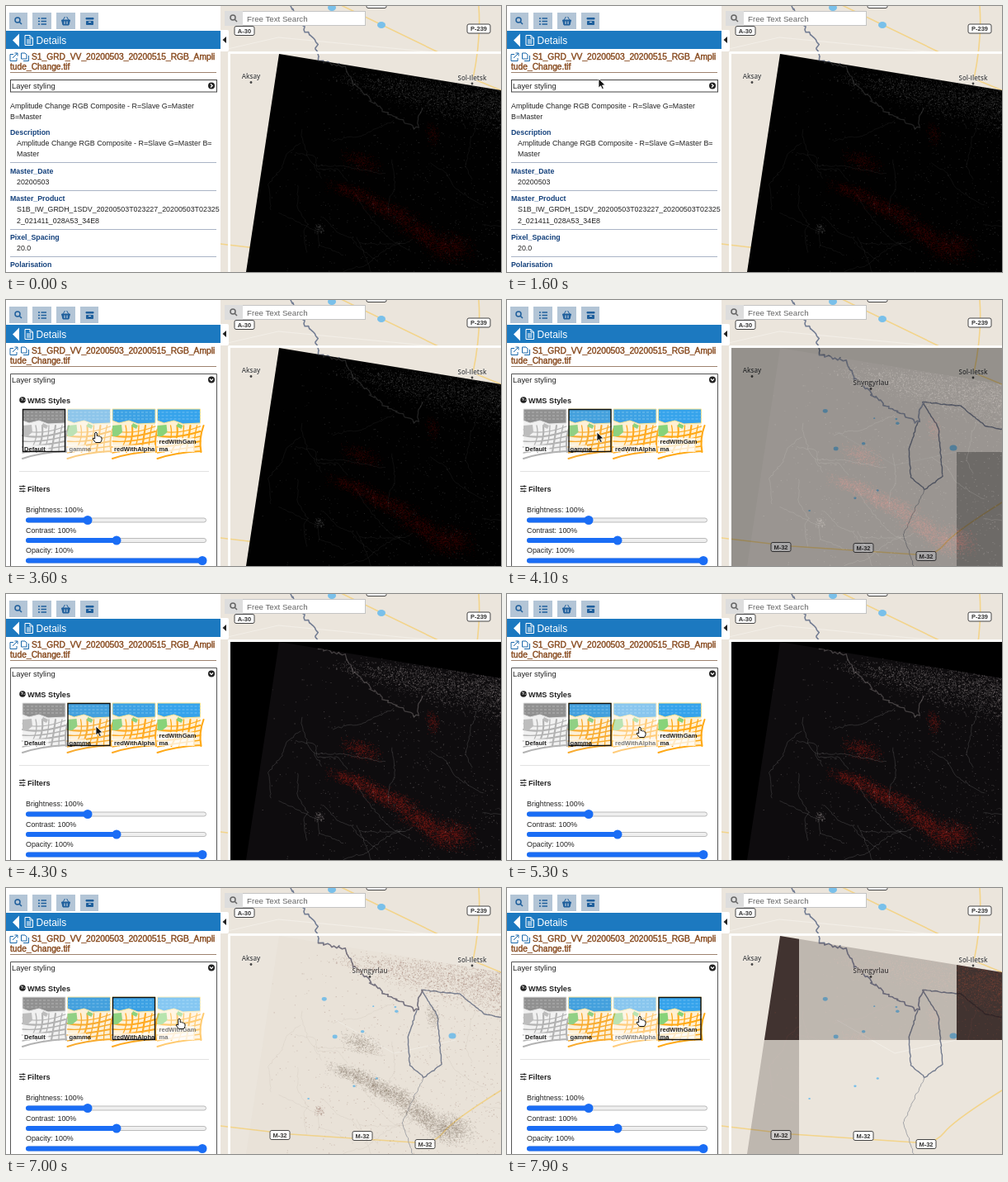
An HTML page with a canvas that plays this animation: 600 by 322 pixels, repeating every 8 s.

```html
<!DOCTYPE html>
<html lang="en">
<head>
<meta charset="utf-8">
<title>Layer styling</title>
<style>
html, body { margin: 0; width: 600px; height: 322px; overflow: hidden; background: #ebe5dc; }
svg, canvas { position: absolute; left: 0; top: 0; }
text { font-family: "Liberation Sans", Arial, sans-serif; font-size: 8.9px; fill: #222; white-space: pre; }
.place { font-family: "Open Sans", sans-serif; font-size: 8px; font-weight: 600; text-anchor: middle; fill: #444; stroke: #f4f0ea; stroke-width: 1.2px; paint-order: stroke; }
.shield { font-size: 7.5px; font-weight: bold; text-anchor: middle; fill: #333; }
.key { font-weight: bold; fill: #14417c; font-size: 8.8px; }
.head { font-weight: bold; font-size: 9.2px; }
.title { font-size: 10.25px; fill: #86481c; stroke: #86481c; stroke-width: .4px; }
.tag { font-size: 7.6px; font-weight: bold; }
.line { fill: none; stroke-linejoin: round; stroke-linecap: round; }
</style>
</head>
<body>
<svg width="600" height="322">
  <rect width="600" height="322" fill="#ebe5dc"/>
  <g class="line">
    <path d="M260 54L330 38L520 56M545 184L470 200L400 160" stroke="#f3efe8"/>
    <path d="M260 288L345 298L495 308Q518 311 530 296T600 245M573 0Q576 40 566 88L600 102M404 -2L524 56" stroke="#f3d48a" stroke-width="1.6"/>
    <path id="river" stroke="#737d93" stroke-width="1.6"/>
    <path id="border" stroke="#747c8f" stroke-width="1.4"/>
    <path id="stream" stroke="#9b9da3" stroke-width=".9"/>
    <path d="M270.500 324V56.500H602" stroke="#fdfdfb" stroke-width="3"/>
  </g>
  <g id="places"></g>
</svg>
<canvas id="layer" width="600" height="322"></canvas>
<svg width="600" height="322">
  <defs>
    <g id="art">
      <rect width="52" height="52" fill="#fcf0d8"/>
      <g id="streets" class="line" stroke="#f5ab35"/>
      <path d="M0 0H52V17L31 18L20 14L8 17L0 14Z" fill="#479fd9" stroke="#f3e3a0"/>
      <path d="M0 4H52M0 8H52M0 12H52" stroke="#7dbde6" stroke-dasharray="3 2"/>
      <path d="M0 20L11 19L12 28L6 33H0ZM25 17L31 20L29 24L23 21Z" fill="#93cf87"/>
    </g>
    <g id="lens" fill="none" stroke-width="1.5"><circle r="3"/><path d="M2.200 2.200L5 5"/></g>
  </defs>

  <rect x="265.500" y="6.500" width="170" height="17" fill="#fff" stroke="#c4c4c4"/>
  <rect x="265" y="6" width="22" height="18" fill="#ddd"/>
  <use href="#lens" x="275" y="14" stroke="#666"/>
  <text x="292" y="18.500" style="font-size:9.7px;fill:#666">Free Text Search</text>
  <rect x="255" y="29" width="15" height="26" rx="2" fill="#fff"/>
  <path d="M267 37V45L262.500 41Z" fill="#222"/>

  <rect width="260" height="322" fill="#fff"/>
  <path d="M4 18H26M32 18H55M61 18H84M90 18H112" stroke="#b3c5d6" stroke-width="20"/>
  <g stroke="#1f5f9c" fill="#1f5f9c">
    <use href="#lens" x="14" y="17"/>
    <path d="M39 15H49M39 18.500H49M39 22H49" stroke-width="1.600" stroke-dasharray="2 1.500 8"/>
    <path d="M67.500 17H77.500L76 23H69ZM69 17L71.500 13M76 17L73.500 13"/>
    <path d="M97 14.500H106V16H97ZM97.500 18.500H105.500V22.500H97.500Z"/>
  </g>
  <path d="M71 18.500V22M74 18.500V22M100 19.500H103" stroke="#d5e0ea"/>
  <rect y="30" width="260" height="22" fill="#1c79c0"/>
  <path d="M16 33.500V49.500L8 41.500Z" fill="#fff"/>
  <path d="M23 35.500H29L32.500 39V47.500H23ZM29 35.500V39H32.500M25 41H30.500M25 43H30.500M25 45H30.500" fill="none" stroke="#fff"/>
  <text x="36.500" y="46" style="font-size:12px;fill:#fff">Details</text>
  <path d="M9 58.500H5V66.500H13V63M8 63L14 57M10.500 57H14V60.500M18.500 57H23L25 59V64H18.500ZM21 66.500H27.500V60" fill="none" stroke="#1c69aa"/>
  <text class="title" x="31" y="65">S1_GRD_VV_20200503_20200515_RGB_Ampli</text>
  <text class="title" x="5" y="76.500">tude_Change.tif</text>
  <path d="M5 80.500H255" stroke="#86644b" stroke-width=".8"/>

  <g id="info"></g>
  <g id="styling">
    <path d="M5.500 323V89.500H255.500V323" fill="none" stroke="#555"/>
    <circle cx="20" cy="121" r="3.800" fill="#222"/>
    <path d="M18 119L20.500 119.500L19 122M21.500 122L23 120.500" fill="none" stroke="#fff" stroke-width=".8"/>
    <text class="head" x="26" y="124.500">WMS Styles</text>
    <g id="thumbs"></g>
    <path d="M16 207.500H246" stroke="#e2e2e2"/>
    <path d="M16 225.500H23.500M16 228.500H23.500M16 231.500H23.500M21 224V227M18 227V230M21 230V233" stroke="#222" stroke-width=".9"/>
    <text class="head" x="26" y="231.500">Filters</text>
    <g id="ranges"></g>
  </g>
  <text x="7" y="99.800" style="font-size:9.4px">Layer styling</text>
  <circle cx="249" cy="96.500" r="4" fill="#222"/>
  <path id="chevron" d="M248 94.500L250.200 96.500L248 98.500" fill="none" stroke="#fff" stroke-width="1.200"/>

  <g id="pointer" stroke-linejoin="round">
    <path id="arrow" d="M0 0V11L2.600 8.700L4.400 12.600L6.300 11.700L4.500 8L8 7.700Z" fill="#111" stroke="#fff" stroke-width=".8"/>
    <path id="hand" d="M-1.300 7V1Q0 -.8 1.200 1V4.500Q2.500 3.700 3.400 5Q4.700 4.400 5.400 5.700Q7 5.500 7 7V9.500L5.500 12.500H-.5L-4 8Q-3.600 6.200 -1.300 8Z" fill="#fff" stroke="#111"/>
  </g>
</svg>
<script>
const $ = id => document.getElementById(id);
const LOOP = 8000, FADE = 250;
const repeat = (n, make) => Array.from({ length: n }, (_, i) => make(i));

let seed = 7;
const rnd = () => (seed = (seed * 1664525 + 1013904223) % 4294967296) / 4294967296;
const jitter = a => (rnd() + rnd() - 1) * a;

// Path through the given points with small random bends between them
function wiggle(points, amp) {
  let d = 'M' + points[0];
  points.slice(1).forEach(([x1, y1], i) => {
    const [x0, y0] = points[i], n = Math.ceil(Math.hypot(x1 - x0, y1 - y0) / 3);
    for (let k = 1; k <= n; k++)
      d += `L${x0 + (x1 - x0) * k / n + jitter(amp)} ${y0 + (y1 - y0) * k / n + jitter(amp)}`;
  });
  return d;
}

const river = wiggle([[345, 0], [362, 28], [376, 46], [380, 66], [412, 73], [420, 92], [456, 127], [498, 148], [504, 124]], 3);
$('river').setAttribute('d', river);
$('border').setAttribute('d', wiggle([[498, 148], [487, 181], [490, 215], [506, 229], [528, 214], [523, 155], [504, 124], [550, 128], [580, 153], [601, 156]], 1));
$('stream').setAttribute('d', wiggle([[506, 229], [480, 285], [494, 322]], 1.5));

const lake = (x, y, r) => `<ellipse cx="${x}" cy="${y}" rx="${r}" ry="${r * .8}" fill="#79c0ea"/>`;
const shield = (x, y, s, w = 24) => `<rect x="${x - w / 2}" y="${y - 5.5}" width="${w}" height="11" rx="2" fill="#fff" stroke="#444"/>
  <text class="shield" x="${x}" y="${y + 2.7}">${s}</text>`;
const place = (x, y, s) => `<circle cx="${x}" cy="${y}" r="1.4" fill="#444"/><text class="place" x="${x}" y="${y - 4.5}">${s}</text>`;
$('places').innerHTML = lake(455, 23, 5) + lake(395, 2, 5) + lake(541, 179, 4.5) +
  repeat(9, () => lake(365 + rnd() * 110, 125 + rnd() * 145, 1 + rnd() * 2)).join('') +
  shield(289, 30, 'A-30') + shield(573, 27.5, 'P-239', 28) + shield(449, -3, '') +
  shield(332, 299, 'M-32') + shield(432, 300, 'M-32') + shield(508, 310, 'M-32') +
  place(297, 92.5, 'Aksay') + place(565, 94, 'Sol-Iletsk') + place(441, 107.5, 'Shyngyrlau');

const txt = (x, y, s, c = '') => `<text x="${x}" y="${y}" class="${c}">${s}</text>`;
let html = '<rect x="5.5" y="89.5" width="250" height="14.5" fill="none" stroke="#444"/>' +
  txt(5, 124, 'Amplitude Change RGB Composite - R=Slave G=Master') + txt(5, 136.5, 'B=Master');
let row = 156;
[['Description', 'Amplitude Change RGB Composite - R=Slave G=Master B=', 'Master'], ['Master_Date', '20200503'],
 ['Master_Product', 'S1B_IW_GRDH_1SDV_20200503T023227_20200503T02325', '2_021411_028A53_34E8'],
 ['Pixel_Spacing', '20.0'], ['Polarisation', '']].forEach(([key, ...values]) => {
  html += txt(5, row, key, 'key');
  values.forEach(v => html += txt(13, row += 13.2, v));
  html += `<path d="M5 ${Math.floor(row + 7.5)}.5H255" stroke="#aab4c6"/>`;
  row += 20.3;
});
$('info').innerHTML = html;

$('streets').innerHTML = repeat(6, i =>
  `<path d="M0 ${25 + i * 7}Q20 ${33 + i * 4} 52 ${21 + i * 6}M${8 + i * 9} 52Q${20 + i * 6} 36 ${16 + i * 8} 20" stroke-width="${1.3 + i % 2 * .8}"/>`).join('');
const thumbX = i => 20 + i * 54.5;
$('thumbs').innerHTML = [['Default'], ['gamma'], ['redWithAlpha'], ['redWithGam', 'ma']].map((lines, i) => {
  const h = 8.5 * lines.length, look = i ? `saturate(${.95 + i * .1})` : 'grayscale(1)';
  return `<g transform="translate(${thumbX(i)} 132)"><use href="#art" style="filter:${look}"/>
    <rect y="${52 - h}" width="${Math.min(52, lines[0].length * 4.5)}" height="${h}" fill="#fff" opacity=".75"/>
    ${lines.map((s, k) => txt(2, 59.5 - h + k * 9 - .5, s, 'tag')).join('')}
    <rect class="frame" x=".5" y=".5" width="51" height="51" fill="none" stroke="#111" stroke-width="1.4"/></g>`;
}).join('');
const thumbs = [...$('thumbs').children];

$('ranges').innerHTML = [['Brightness', 99], ['Contrast', 134], ['Opacity', 238]].map(([s, x], i) => {
  const y = 266.5 + i * 24.5;
  return txt(24, y - 9.5, s + ': 100%') + `<rect x="24.5" y="${y - 2.5}" width="218" height="5" rx="2.5" fill="#efefef" stroke="#bbb"/>
    <rect x="24" y="${y - 3}" width="${x - 24}" height="6" rx="3" fill="#1a6df5"/><circle cx="${x}" cy="${y}" r="5.5" fill="#1a6df5"/>`;
}).join('');

// Radar scene; every style shows the same features in other colours
function scene({ back, fill, red, grey, line }) {
  seed = 42;
  const c = document.createElement('canvas');
  c.width = 600; c.height = 322;
  const g = c.getContext('2d');
  const edge = x => 58 + (x - 331) * .164;
  const dot = (x, y) => g.fillRect(x, y, .5 + rnd() * .9, .5 + rnd() * .7);
  const smudge = (x, y, rx, ry) => repeat(rx * ry * 1.6 | 0, () => {
    const dx = jitter(rx);
    dot(x + dx, y + dx * .25 + jitter(ry));
  });
  if (back) { g.fillStyle = back; g.fillRect(272, 58, 328, 264); }
  g.clip(new Path2D('M331 58L600 102V322H291Z'));
  g.fillStyle = fill;
  g.fillRect(0, 0, 600, 322);

  // Burnt ground: a band running down to the right
  g.fillStyle = red;
  smudge(430, 188, 28, 14);
  smudge(516, 155, 9, 16);
  repeat(9, i => smudge(410 + i * 17, 217 + i * 10 + jitter(12), 26, 10 + i));

  // Settled ground: dense below the upper edge, thin elsewhere
  g.fillStyle = grey;
  repeat(2600, () => {
    const x = 390 + 210 * Math.sqrt(rnd());
    dot(x, edge(x) + 18 + jitter(10 + (x - 390) * .15));
  });
  repeat(900, () => dot(300 + 300 * Math.sqrt(rnd()), 80 + rnd() * 242));
  smudge(380, 270, 7, 7);

  g.strokeStyle = line;
  g.lineWidth = .6;
  repeat(16, () => {
    const x = 310 + rnd() * 280, y = 100 + rnd() * 200, a = rnd() * 6.28;
    g.stroke(new Path2D(wiggle(repeat(5, k => [x + 20 * k * Math.cos(a) + jitter(12), y + 20 * k * Math.sin(a) + jitter(12)]), 1.5)));
  });
  g.strokeStyle = grey;
  g.lineWidth = 1.3;
  g.stroke(new Path2D(river));
  return c;
}

// Tiles are numbered row by row; start gives the time each begins to fade in
const order = [0, 1, 0, 1, 2, 3];
const layers = [
  { at: 0, start: () => -FADE,
    look: { fill: '#010101', red: 'rgba(130,22,18,.16)', grey: 'rgba(130,130,130,.25)', line: 'rgba(120,120,120,.2)' } },
  { at: 3700, start: i => 4010 - 50 * (i > 4),
    look: { back: '#000', fill: '#0e0c0e', red: 'rgba(180,42,32,.26)', grey: 'rgba(165,155,155,.36)', line: 'rgba(150,150,150,.4)' } },
  { at: 5350, start: () => 5600,
    look: { fill: 'rgba(190,175,160,.05)', red: 'rgba(100,85,72,.2)', grey: 'rgba(125,85,70,.28)', line: 'rgba(150,125,110,.16)' } },
  { at: 7200, start: i => 7685 + 160 * order[i],
    look: { fill: '#261716', red: 'rgba(140,40,25,.3)', grey: 'rgba(125,48,34,.4)', line: 'rgba(105,45,38,.35)' } }
];
layers.forEach(l => l.img = scene(l.look));
const colX = [272, 354, 545, 600], rowY = [56, 184, 322];
const ctx = $('layer').getContext('2d');

function drawLayer(t, { start, img }) {
  ctx.clearRect(0, 0, 600, 322);
  order.forEach((_, i) => {
    const c = i % 3, r = i / 3 | 0, x = colX[c], y = rowY[r], w = colX[c + 1] - x, h = rowY[r + 1] - y;
    ctx.globalAlpha = Math.min(1, Math.max(0, (t - start(i)) / FADE));
    ctx.drawImage(img, x, y, w, h, x, y, w, h);
  });
}

// Pointer rests: arrive, leave, x, y
const rests = [[0, 600, 200, -20], [1400, 1800, 111, 88], [2100, 2900, 93, 96], [3500, 4700, 109, 160],
  [5200, 6500, 161, 161], [7000, 7250, 210, 158], [7650, LOOP, 161, 155]];
function pointerAt(t) {
  const i = rests.findLastIndex(r => t >= r[0]), [, leave, x, y] = rests[i];
  if (t <= leave) return [x, y];
  const [arrive, , x1, y1] = rests[i + 1], p = (t - leave) / (arrive - leave), e = p * p * (3 - 2 * p);
  return [x + (x1 - x) * e, y + (y1 - y) * e];
}

const show = (el, on) => el.style.display = on ? '' : 'none';
const begin = performance.now();

function draw() {
  const t = (performance.now() - begin) % LOOP, open = t >= 2300, [x, y] = pointerAt(t);
  const chosen = layers.findLastIndex(l => t >= l.at);
  const over = i => open && y > 132 && y < 184 && x >= thumbX(i) && x <= thumbX(i) + 52 && i !== chosen;
  const hand = y > 90 && y < 104 || thumbs.some((_, i) => over(i));
  drawLayer(t, layers[chosen]);
  show($('info'), !open);
  show($('styling'), open);
  $('chevron').setAttribute('transform', open ? 'rotate(90 249 96.5)' : '');
  thumbs.forEach((g, i) => {
    g.style.opacity = over(i) ? .6 : 1;
    show(g.querySelector('.frame'), i === chosen);
  });
  show($('hand'), hand);
  show($('arrow'), !hand);
  $('pointer').setAttribute('transform', `translate(${x} ${y})`);
  requestAnimationFrame(draw);
}
draw();
</script>
</body>
</html>
```
